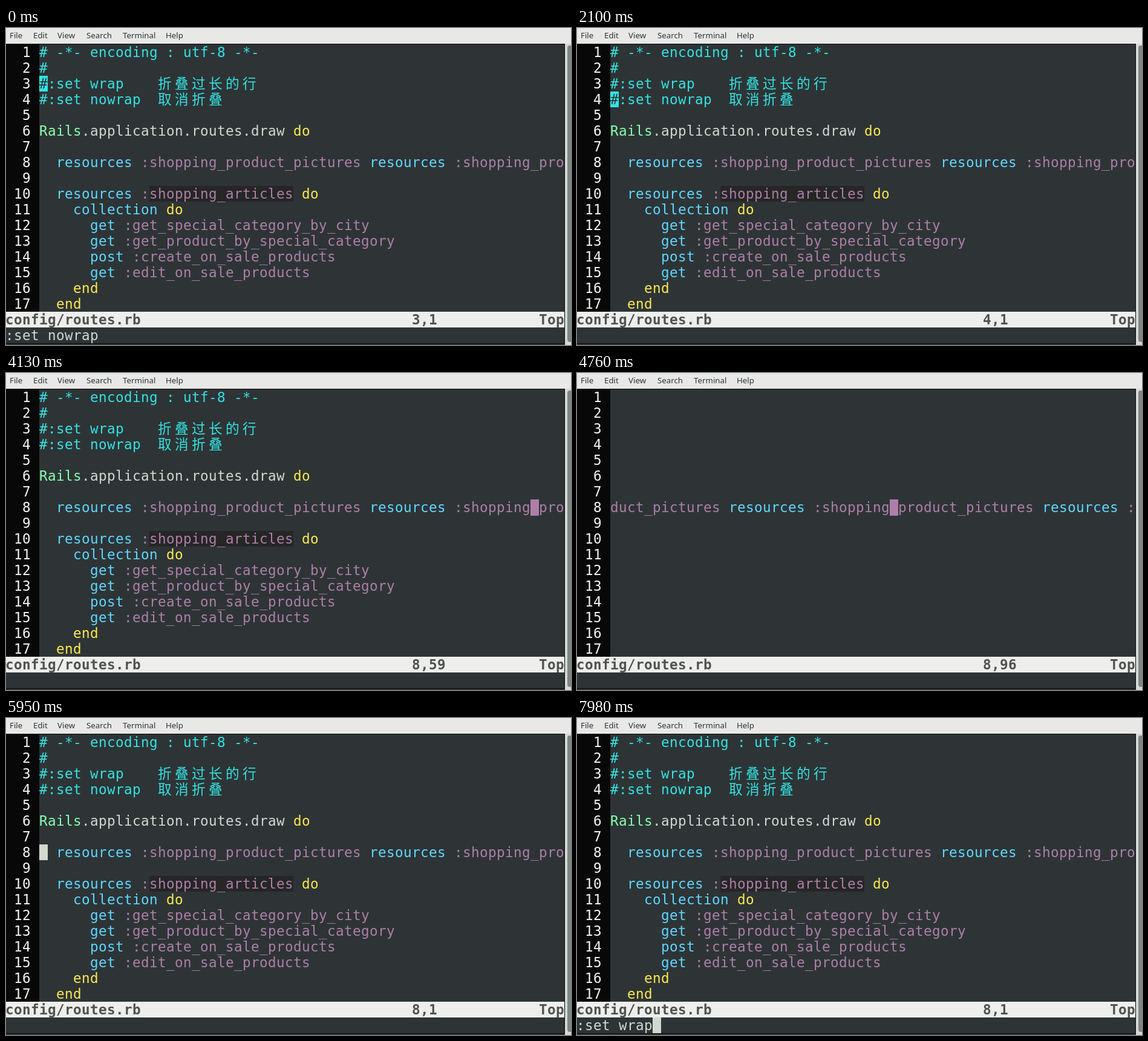
These frames come from a looping animation (934 by 524 pixels, 8000 ms). An HTML page with a canvas:

```html
<!DOCTYPE html>
<html lang="en">
<head>
<meta charset="utf-8">
<title>Terminal editor</title>
<style>
  html, body { margin: 0; width: 100%; height: 100%; overflow: hidden; background: #2e3436; }
  canvas { display: block; }
</style>
</head>
<body>
<canvas id="stage" width="934" height="524"></canvas>
<script>
const ctx = document.getElementById('stage').getContext('2d');

const LOOP = 8000;
const CW = 14, CH = 26, LEFT = -1, TOP = 27, BASE = 21;
const GUTTER = 4, COLS = 62, RIGHT = 923;
const STATUS = 18, COMMAND = 19;
const MONO = '22.67px "DejaVu Sans Mono", monospace';
const HAN = '22.67px "Noto Sans CJK SC", "Noto Sans CJK", sans-serif';
const MENU = '13.3px "Noto Sans", "Open Sans", sans-serif';

const C = {
  bg: '#2e3436', gutter: '#080808', number: '#f4f4f2', plain: '#d3d7cf',
  comment: '#34e2e2', word: '#5fd7ff', symbol: '#ad7fa8', block: '#fce94f',
  constant: '#87ffaf', match: '#262626', bar: '#eeeeec', barText: '#4e534f'
};

const SOURCE = [
  '# -*- encoding : utf-8 -*-',
  '#',
  '#:set wrap    折叠过长的行',
  '#:set nowrap  取消折叠',
  '',
  'Rails.application.routes.draw do',
  '',
  ' ' + ' resources :shopping_product_pictures'.repeat(6),
  '',
  '  resources :shopping_articles do',
  '    collection do',
  '      get :get_special_category_by_city',
  '      get :get_product_by_special_category',
  '      post :create_on_sale_products',
  '      get :edit_on_sale_products',
  '    end',
  '  end'
];

const RULES = [
  [/^:\w+/, 'symbol'],
  [/^(do|end)\b/, 'block'],
  [/^(resources|collection|get|post)\b/, 'word'],
  [/^Rails\b/, 'constant'],
  [/^(\w+|\W)/, 'plain']
];

// Splits a line into cells: { ch, color, col }
function toCells(line) {
  const cells = [];
  let col = 0;
  const add = (text, color) => {
    for (const ch of text) {
      cells.push({ ch, color, col });
      col += isHan(ch) ? 2 : 1;
    }
  };
  if (line[0] === '#') {
    add(line, C.comment);
    return cells;
  }
  while (line) {
    const [rule, kind] = RULES.find(([re]) => re.test(line));
    const text = line.match(rule)[0];
    add(text, C[kind]);
    line = line.slice(text.length);
  }
  return cells;
}

function isHan(ch) { return ch > '\u2e80'; }

const LINES = SOURCE.map(toCells);

const cellX = col => LEFT + col * CW;
const rowY = row => TOP + (row - 1) * CH;

function rect(color, x, y, w, h) {
  ctx.fillStyle = color;
  ctx.fillRect(x, y, w, h);
}

function glyph(ch, color, col, row, bold) {
  if (ch === ' ') return;
  ctx.font = isHan(ch) ? HAN : (bold ? 'bold ' : '') + MONO;
  ctx.fillStyle = color;
  ctx.fillText(ch, cellX(col), rowY(row) + BASE);
}

function print(text, color, col, row, bold) {
  [...text].forEach((ch, i) => glyph(ch, color, col + i, row, bold));
}

// Cursor moves: [time, row, column]
const MOVES = [
  [0, 3, 1], [1540, 4, 1], [2170, 5, 1], [2380, 6, 1], [2520, 7, 1],
  [2730, 8, 1], [2940, 8, 2], [3220, 8, 6], [5950, 8, 1]
];

// Command line contents: [time, text]
const COMMANDS = [
  [0, ':set nowrap'], [840, 'E446: No file name under cursor'], [2100, ''],
  [6580, ':'], [6860, ':s'], [7000, ':se'], [7140, ':set'], [7210, ':set '],
  [7420, ':set w'], [7490, ':set wr'], [7910, ':set wra'], [7980, ':set wrap']
];

const latest = (list, t) => list.filter(item => item[0] <= t).pop();

function stateAt(t) {
  let [, row, col] = latest(MOVES, t);
  if (t >= 3220 && t < 5950) {
    const step = Math.min(33, Math.floor((t - 3220) / 70));
    col = Math.floor(6 + 4.1 * step + 1e-6);
  }
  const index = col - 1;
  return {
    row, col,
    scroll: index < COLS ? 0 : Math.floor(index / 31) * 31 - 31,
    command: latest(COMMANDS, t)[1],
    typing: t >= 6580,
    cursor: !(t >= 490 && t < 700)
  };
}

function drawFrame() {
  rect(C.bg, 0, 0, 934, 524);
  rect('#e8e8e7', 0, 0, 934, 26);
  ctx.font = MENU;
  ctx.fillStyle = '#2e3436';
  [['File', 6], ['Edit', 45], ['View', 85], ['Search', 133], ['Terminal', 193], ['Help', 264]]
    .forEach(([label, x]) => ctx.fillText(label, x, 17));
  rect('#080808', 0, 26, 924, 1);
  rect(C.gutter, 0, TOP, 55, 17 * CH);
  rect('#080808', RIGHT, 26, 1, 496);
  rect('#080808', 0, 521, 924, 1);
  rect('#d8d8d6', 924, 26, 10, 498);
  ctx.fillStyle = '#7e8684';
  ctx.beginPath();
  ctx.roundRect(928, 29, 8, 490, 4);
  ctx.fill();
}

function drawText(s) {
  LINES.forEach((cells, i) => {
    const row = i + 1;
    print(String(row).padStart(3), C.number, 0, row);
    if (row === 10 && s.scroll === 0) {
      rect(C.match, cellX(GUTTER + 13), rowY(row), 17 * CW, CH);
    }
    for (const { ch, color, col } of cells) {
      const x = col - s.scroll;
      if (x >= 0 && x < COLS) glyph(ch, color, GUTTER + x, row);
    }
  });
}

function drawCursor(s) {
  if (s.typing) {
    rect(C.plain, cellX(s.command.length), rowY(COMMAND), CW, CH);
    return;
  }
  if (!s.cursor) return;
  const cell = LINES[s.row - 1][s.col - 1] || { ch: ' ', color: C.plain };
  const col = GUTTER + s.col - 1 - s.scroll;
  rect(cell.color, cellX(col), rowY(s.row), CW, CH);
  if (cell.ch !== '_') glyph(cell.ch, C.bg, col, s.row);
}

function drawStatus(s) {
  const column = LINES[s.row - 1].length ? s.col : '0-1';
  rect(C.bar, 0, rowY(STATUS), RIGHT, CH);
  print('config/routes.rb', C.barText, 0, STATUS, true);
  print(s.row + ',' + column, C.barText, 48, STATUS, true);
  print('Top', C.barText, 63, STATUS, true);
  print(s.command, C.plain, 0, COMMAND);
}

function draw(t) {
  const s = stateAt(t);
  drawFrame();
  drawText(s);
  drawStatus(s);
  drawCursor(s);
}

const start = performance.now();
function tick() {
  draw((performance.now() - start) % LOOP);
  requestAnimationFrame(tick);
}
tick();
</script>
</body>
</html>
```
